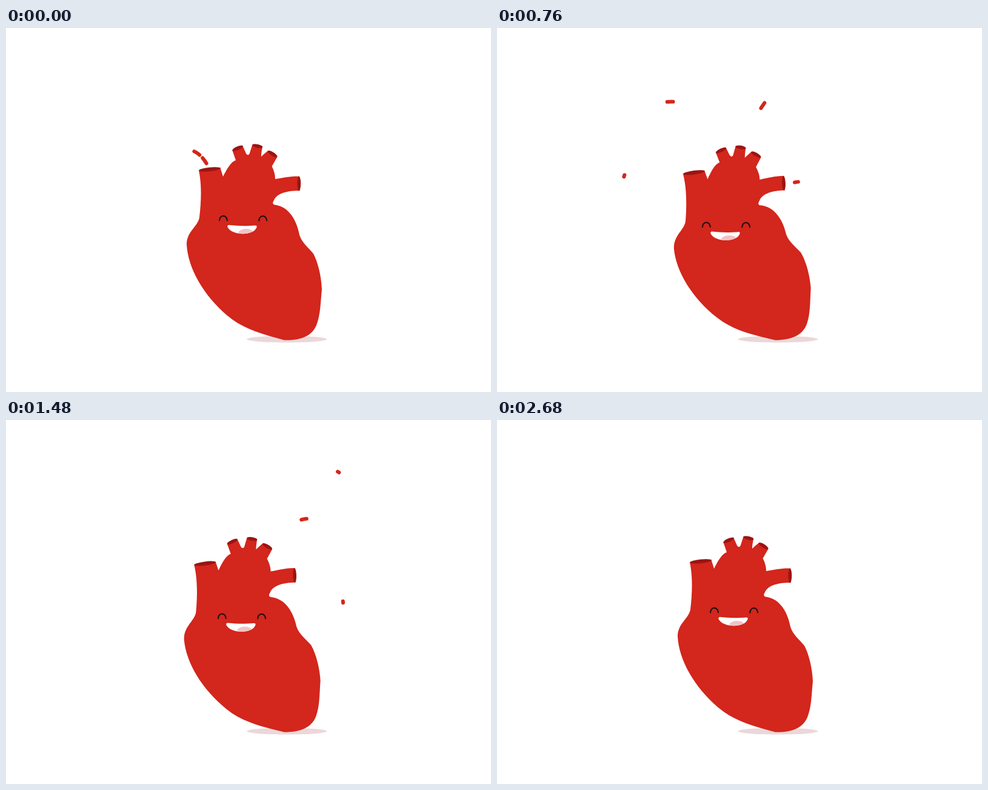
Animation, 800 px wide and 600 px high, one loop 2.84 s. Source, as an HTML page:

```html
<!DOCTYPE html>
<html lang="en">
<head>
<meta charset="utf-8">
<title>Happy heart</title>
<style>
html, body { margin: 0; width: 100%; height: 100%; overflow: hidden; background: #fff; }
svg { display: block; width: 100%; height: 100%; }
</style>
</head>
<body>
<svg viewBox="0 0 800 600" xmlns="http://www.w3.org/2000/svg">
  <defs>
    <clipPath id="mouthClip"><use href="#mouth"/></clipPath>
  </defs>
  <ellipse cx="463.3" cy="513" rx="66" ry="5.5" fill="#ebd7d9"/>
  <g fill="none" stroke="#d3261c" stroke-width="6" stroke-linecap="round">
    <path id="vein" d="M337 236C332 224 325 212 313.5 205S262 184 238.5 203.700S210 240 205 262"/>
    <path id="left" d="M381 190C375 176 370 169 362.5 159.300S320 117 279.5 122S217 148 195 195"/>
    <path id="middle" d="M409 208C412 193 424 150 435.5 132S462 97 485 88S534 76 550 87S560 93 565 97"/>
    <path id="right" d="M437 212C443 205 446 202 450 196S472 167 491 163.500S525 166 540 176"/>
    <path id="side" d="M476 257C505 252 512 250 529.5 261S555 285 556 301S558 312 558 320"/>
  </g>
  <g id="heart">
    <path fill="#d3261c" d="M318 234.5C322 253 323 278 319 312C317 327 298 335 298 357
      C300 395 325 440 365 474C392 497 425 505 459 514.5C485 515 504 509 512 490
      C519 472 518.5 455 521 431C520 405 513 383 507 372C498 361 488 354 484 341
      C480 319 468 295 444 291.5C440 291.5 439 288 442 284C446 274 460 268 484.5 268.3
      L484 244.5C468 244 458 247 444 249C444 241 442 235 438.5 228L447.5 212.5L432 202.5
      Q425 208 421 212Q420.5 209 423 196L406.5 192L402 206C401 210 398 210 396 207
      L390.5 194.5L373.5 202L379 218C370 221 363 235 358 245L353.5 230.5Z"/>
    <g fill="#9b1511">
      <ellipse rx="18" ry="3.2" transform="translate(336 233) rotate(-6)"/>
      <ellipse rx="9.5" ry="2.9" transform="translate(382 198.2) rotate(-23)"/>
      <ellipse rx="8.7" ry="2.9" transform="translate(414.8 194.6) rotate(12)"/>
      <ellipse rx="9.2" ry="2.9" transform="translate(439.6 207.5) rotate(32)"/>
      <ellipse cx="483.3" cy="256.5" rx="2.9" ry="12"/>
    </g>
  </g>
  <g id="face">
    <g fill="none" stroke="#1c1010" stroke-width="2.1">
      <path id="eye" d="M352 318.3C351.7 307 364.7 307 364.9 318"/>
      <use href="#eye" x="65.3" y=".2"/>
    </g>
    <path id="mouth" fill="#fff" d="M368 324.8C381 326.5 398 326.5 411 325.4
      Q414.8 325.2 413.3 329C408 342.5 374 342.5 365.9 329Q364 325 368 324.8Z"/>
    <ellipse cx="396" cy="338.5" rx="13" ry="7.6" fill="#f2c3c5" clip-path="url(#mouthClip)"/>
  </g>
</svg>
<script>
const LOOP = 2840, STEP = 40, LAST = 2680, PEAK = 1120;
const $ = id => document.getElementById(id);

// start in ms, speed in px per ms, dash and follower lengths in px
const streams = [
  { id: "vein", start: -220, speed: .172, size: 11, tail: 11 },
  { id: "left", start: 308, speed: .275, size: 11, tail: 4 },
  { id: "middle", start: 275, speed: .177, size: 11, tail: 2 },
  { id: "right", start: 928, speed: .135, size: 11, tail: 0 },
  { id: "side", start: 610, speed: .12, size: 6, tail: 0 }
];
for (const s of streams) {
  s.path = $(s.id);
  s.total = s.path.getTotalLength();
}

const clamp = u => Math.min(1, Math.max(0, u));

function ease(t, from, to) {
  const u = clamp((t - from) / (to - from));
  return u * u * (3 - 2 * u);
}

// Quick rise to 1 at PEAK, then a slowing return to 0
function pulse(t, fall) {
  return t < PEAK ? 1 - (1 - t / PEAK) ** 1.45 : ((LAST - t) / (LAST - PEAK)) ** fall;
}

function drawStream({ path, total, start, speed, size, tail }, t) {
  const at = (t - start) * speed;
  path.style.display = at > 0 && at < total ? "" : "none";
  const len = size * (1 - clamp(at / total) ** 3);
  const follow = tail * clamp((80 - at) / 40);
  const head = at - len / 2, back = at - 18 - follow / 2;
  const pair = follow > 0;
  const dashes = pair ? [follow, head - back - follow, len, 9999] : [len, 9999];
  path.setAttribute("stroke-dasharray", dashes.join(" "));
  path.setAttribute("stroke-dashoffset", pair ? -back : -head);
}

function draw(t) {
  const x = -14 * ease(t, 0, 900) + 22 * ease(t, 900, 2000) - 8 * ease(t, 2000, LAST);
  const y = 13.3 * pulse(t, 1.2);
  $("heart").setAttribute("transform", `rotate(${-2.84 * pulse(t, 2.2)} 461 514)`);
  $("face").setAttribute("transform", `translate(${x} ${y})`);
  for (const s of streams) drawStream(s, t);
}

function tick() {
  const t = performance.now() % LOOP;
  draw(Math.min(LAST, Math.floor(t / STEP) * STEP));
  requestAnimationFrame(tick);
}
tick();
</script>
</body>
</html>
```
